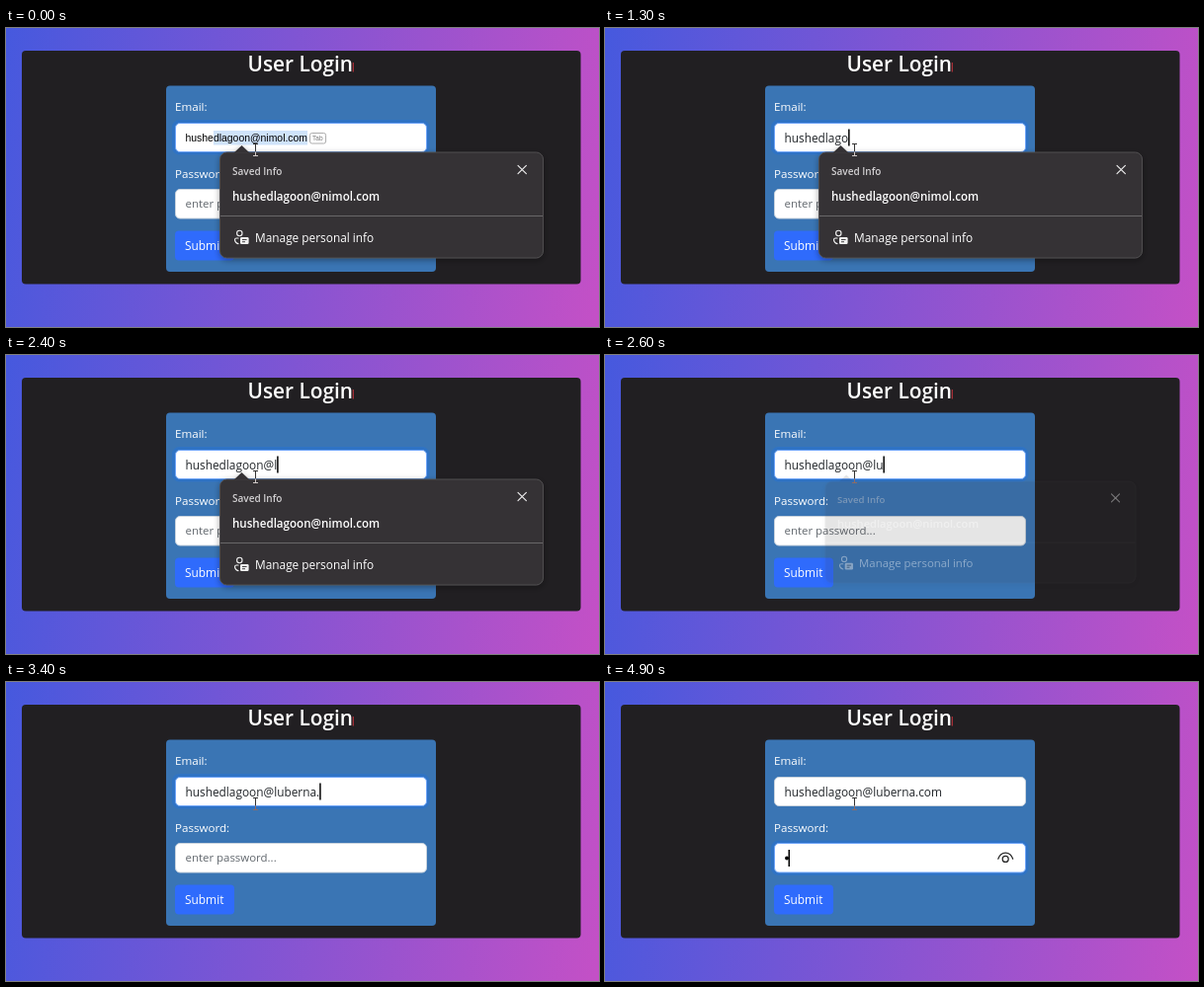
These frames come from a looping animation (600 px wide and 303 px high, 5 s). An HTML page:

```html
<!DOCTYPE html>
<html lang="en">
<head>
<meta charset="utf-8">
<title>User Login</title>
<style>
  html, body { margin: 0; width: 100%; height: 100%; overflow: hidden; }
  body { background: linear-gradient(98deg, #4659de, #c450c6); }
  svg { display: block; width: 100%; height: 100%; }
  text { font-family: "Open Sans", "Noto Sans", sans-serif; font-size: 11.6px; fill: #fff; }
  .title { font-size: 20.8px; font-weight: 600; }
  .typed { font-size: 11.85px; fill: #212529; }
  .hint { font-size: 11.45px; fill: #62686e; }
  .preview { font-family: "Liberation Sans", Arial, sans-serif; font-size: 10.43px; fill: #000; }
  .tab { font-family: "Liberation Sans", Arial, sans-serif; font-size: 6.5px; fill: #777; }
  .small { font-size: 10px; font-weight: 600; fill: #d2d0d2; }
  .saved { font-weight: 600; }
  .field { fill: #fff; stroke: #c9d3de; stroke-width: 1; }
  .field.focus { stroke: #6ea4f8; }
  .glow { fill: none; stroke: #0d6efd; stroke-width: 3; opacity: .22; }
  .line { fill: none; stroke: #f2f2f2; stroke-width: 1.1; stroke-linecap: round; }
</style>
</head>
<body>
<svg viewBox="0 0 600 303" preserveAspectRatio="none">
  <defs>
    <filter id="shade" x="-10%" y="-15%" width="120%" height="135%">
      <feDropShadow dx="0" dy="2" stdDeviation="3" flood-opacity=".35"/>
    </filter>
  </defs>

  <rect x="16" y="23" width="565.5" height="236.5" rx="4" fill="#211f22"/>
  <text class="title" x="244.5" y="44">User Login</text>
  <path d="M351.3 35V44.5" stroke="#c5323c" stroke-width="1"/>
  <rect x="162" y="58.5" width="273" height="188.5" rx="4" fill="#3a75b4"/>

  <text x="171" y="84">Email:</text>
  <text x="171" y="152">Password:</text>
  <rect id="glow" class="glow" x="169.5" y="94.5" width="257.5" height="32.5" rx="6"/>
  <rect id="mailBox" class="field" x="171.5" y="96.5" width="254" height="29" rx="4.5"/>
  <rect id="passBox" class="field" x="171.5" y="163.5" width="254" height="29.5" rx="4.5"/>

  <text id="typed" class="typed" x="181.5" y="115.5"></text>
  <g id="preview">
    <rect id="mark" y="104" height="14.5" fill="#cfe3fa"/>
    <text id="full" class="preview" x="181.5" y="115.3"></text>
    <g id="tab">
      <rect x="2.5" y="106.5" width="16" height="10.5" rx="2" fill="#fff" stroke="#a3a3a3" stroke-width=".9"/>
      <text class="tab" x="5" y="114.3">Tab</text>
    </g>
  </g>

  <text id="hint" class="hint" x="181.5" y="182">enter password...</text>
  <g id="secret">
    <circle cx="184" cy="178.5" r="1.9"/>
    <path d="M397.8 179.3C400.5 171 410 171 412.7 179.3" fill="none" stroke="#222" stroke-width="1.2" stroke-linecap="round"/>
    <circle cx="405.2" cy="179.4" r="3" fill="none" stroke="#222" stroke-width="1.2"/>
  </g>
  <rect id="caret" width="1.5" height="17" fill="#000"/>

  <rect x="171" y="205.5" width="60" height="30" rx="4" fill="#2f6bfc"/>
  <text x="181" y="225" style="font-size:11.9px">Submit</text>

  <g id="popup">
    <g id="panel">
      <g filter="url(#shade)">
        <rect x="216.5" y="126" width="327" height="107" rx="7" fill="#343234" stroke="#504e50"/>
        <path d="M230.5 126.6L238.5 119L246.5 126.6Z" fill="#343234"/>
      </g>
      <path d="M217 190.5H543" stroke="#696769"/>
    </g>
    <g id="labels">
      <text class="small" x="229" y="149">Saved Info</text>
      <path class="line" d="M518 139.3L526.4 147.7M526.4 139.3L518 147.7"/>
      <text id="saved" class="saved" x="229" y="175.3"></text>
      <circle class="line" cx="236.3" cy="208" r="2.7"/>
      <path class="line" d="M235 213H233.2Q231.5 213 231.5 214.8Q232 218 235 218.6"/>
      <rect x="237" y="212" width="8.6" height="7" rx="1.3" fill="#f2f2f2"/>
      <path d="M239 214.5H243.6M239 216.7H242" stroke="#343234" stroke-width=".9"/>
      <text x="252" y="216.5" style="font-size:11.85px">Manage personal info</text>
    </g>
  </g>

  <g fill="none" stroke-width="1">
    <path d="M250 117.5H255M252.5 117.5V125.5" stroke="#333"/>
    <path id="beam" d="M252.5 125.5V129.5M250 129.5H255"/>
  </g>
</svg>
<script>
const LOOP = 5000, STEP = 100, LEFT = 181.5;
const USER = "hushedlagoon";
const SAVED = USER + "@nimol.com";
const FINAL = USER + "@luberna.com";

// Moments at which each further character of FINAL appears
const START = 5;
const KEYS = [300, 500, 700, 1000, 1200, 1400, 1700, 2200, 2400, 2600,
              2800, 2900, 3100, 3200, 3300, 3400, 3600, 3700, 3800];
const PLAIN = 200;      // typed text shows this long before the suggestion returns
const REJECT = 2400;    // no suggestion from here on
const TAB = 4000, DOT = 4800;

// time, scale, panel opacity, label opacity
const FADE = [[0, 1, 1, 1], [2500, .98, .6, .75], [2600, .96, .12, .42], [2700, .96, 0, 0]];

const $ = id => document.getElementById(id);
const show = (id, on) => $(id).style.display = on ? "" : "none";
const set = (id, attrs) => {
  for (const k in attrs) $(id).setAttribute(k, attrs[k]);
};

$("full").textContent = $("saved").textContent = SAVED;

function drawEmail(t) {
  const past = KEYS.filter(k => k <= t);
  const last = past.length ? past[past.length - 1] : -PLAIN;
  const count = START + past.length;
  const suggest = t < REJECT && t - last >= PLAIN;

  show("preview", suggest);
  show("typed", !suggest);
  $("typed").textContent = FINAL.slice(0, count);
  if (suggest) {
    const from = $("full").getSubStringLength(0, count);
    const end = $("full").getComputedTextLength();
    set("mark", { x: LEFT + from, width: end - from });
    set("tab", { transform: `translate(${LEFT + end} 0)` });
  }
  return suggest;
}

function drawCaret(t, suggest) {
  const inPass = t >= TAB;
  const blinkOff = inPass && t < DOT && t - TAB >= 500;
  show("caret", !suggest && !blinkOff);
  if (inPass) set("caret", { x: t < DOT ? 181 : 185.5, y: 170 });
  else if (!suggest) set("caret", { x: LEFT + $("typed").getComputedTextLength(), y: 102.5 });
}

function drawPassword(t) {
  const inPass = t >= TAB;
  $("mailBox").classList.toggle("focus", !inPass);
  $("passBox").classList.toggle("focus", inPass);
  set("glow", { y: inPass ? 162 : 94.5 });
  show("hint", t < DOT);
  show("secret", t >= DOT);
}

function drawPopup(t) {
  const [, scale, panel, labels] = FADE.filter(f => f[0] <= t).pop();
  show("popup", labels > 0);
  set("popup", { transform: `translate(380 180) scale(${scale}) translate(-380 -180)` });
  set("panel", { opacity: panel });
  set("labels", { opacity: labels });
  set("beam", { stroke: panel > .5 ? "#cfc8c6" : "#8d6c66" });
}

function draw(now) {
  const t = Math.floor((now % LOOP) / STEP) * STEP;
  drawCaret(t, drawEmail(t));
  drawPassword(t);
  drawPopup(t);
}

const begin = performance.now();
function tick() {
  draw(performance.now() - begin);
  requestAnimationFrame(tick);
}
tick();
</script>
</body>
</html>
```
